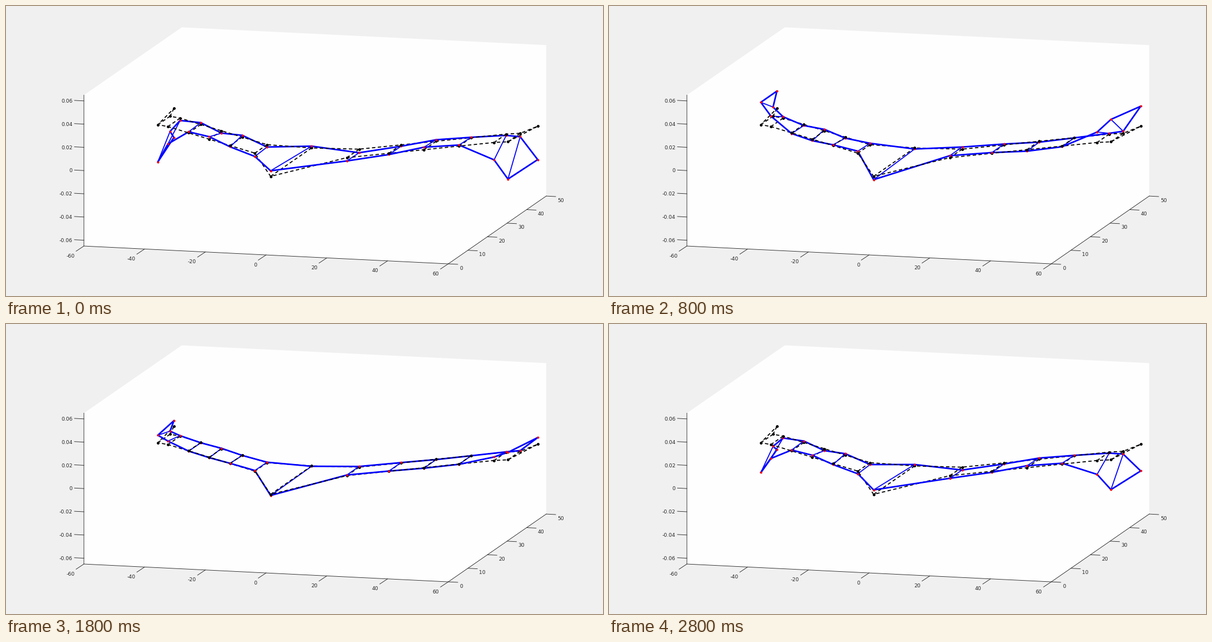
These frames come from a looping animation (1073x522 px, 3 s). A matplotlib script:

```python
import numpy as np
import matplotlib.pyplot as plt
from matplotlib.animation import FuncAnimation

W, H, DPI = 1073, 522, 100
PX = 72 / DPI
INK = "#262626"
SPAN, DEPTH, TOP = 60, 50, 0.065
RISE = 2090  # pixels per unit of z

fig = plt.figure(figsize=(W / DPI, H / DPI), dpi=DPI, facecolor="#f0f0f0")
ax = fig.add_axes([0, 0, 1, 1])
ax.set_xlim(0, W)
ax.set_ylim(H, 0)
ax.axis("off")


def project(x, y, z=0.0):
    """Orthographic view of the data box, in stage pixels."""
    px = 140 + 5.458 * (x + SPAN) + 3.52 * y
    py = 296.2 + 0.267 * (x + SPAN) - 2.44 * y - RISE * z
    return px, py


def line(xs, ys, color, width, **kw):
    return ax.plot(xs, ys, color=color, lw=width * PX, **kw)[0]


def tick(point, step, gap, text, ha):
    """Tick mark along step, with its label at the given gap."""
    px, py = point
    line([px, px + step[0]], [py, py + step[1]], INK, 0.9, zorder=1)
    ax.text(px + gap[0], py + gap[1], text, ha=ha, va="center_baseline",
            color=INK, family="DejaVu Sans", fontsize=9.3 * PX)


def draw_box():
    corners = [(-SPAN, 0, TOP), (-SPAN, DEPTH, TOP), (SPAN, DEPTH, TOP),
               (SPAN, DEPTH, -TOP), (SPAN, 0, -TOP), (-SPAN, 0, -TOP)]
    px, py = project(*np.array(corners).T)
    ax.fill(px, py, color="#fefefe", lw=0, zorder=0)
    line(px[[0, 5, 4, 3]], py[[0, 5, 4, 3]], INK, 0.9, zorder=1)
    for v in range(-6, 7, 2):
        text = f"{v / 100:.2f}" if v else "0"
        tick(project(-SPAN, 0, v / 100), (-17, -0.9), (-20.4, -0.4), text, "right")
    for v in range(-SPAN, SPAN + 1, 20):
        tick(project(v, 0, -TOP), (-14, 9.3), (-16.5, 17), str(v), "right")
    for v in range(0, DEPTH + 1, 10):
        tick(project(SPAN, v, -TOP), (17, 0.9), (20, 7), str(v), "left")


def wave(x, size, reach):
    """Ripple that fades from the root of the wing outwards."""
    return size * np.cos(2 * np.pi * x / 38) * np.exp(-x / reach)


def curl(x, start, end, power):
    """Bend from 0 at start to 1 at end."""
    return np.clip((x - start) / (end - start), 0, None) ** power


# Flat swept wing, mirrored about x = 0
ROOT, OUTER, RIM, TIP = 15.15, 53.7, 57.65, 59.9
half = np.r_[ROOT, np.linspace(26.15, OUTER, 4), RIM]
front_x = np.r_[-half[::-1], 0, half]
back_x = np.r_[-TIP, front_x, TIP]
front_y = np.interp(abs(front_x), [0, ROOT, OUTER, RIM], [2.3, 17.75, 33.15, 34.1])
back_y = np.interp(abs(back_x), [0, ROOT, OUTER, RIM, TIP],
                   [23.25, 24, 39.35, 40.35, 45.8])

# Mode shape in pixels, positive downwards
front_r, back_r = abs(front_x), abs(back_x)
front_d = wave(front_r, 10, 50) - 64 * curl(front_r, 44.4, RIM, 2.3)
zigzag = 3.7 * np.cos(np.pi * np.arange(-7, 8)) - 0.5
left_d = zigzag - 48 * curl(back_r, OUTER, TIP, 1)
right_d = wave(back_r, 12, 30) - 0.6 - 58 * curl(back_r, OUTER, TIP, 6)
back_d = np.where(back_x <= 0, left_d, right_d)

x, rest = project(np.r_[back_x, front_x[::-1]], np.r_[back_y, front_y[::-1]])
swing = np.r_[back_d, front_d[::-1]]
n = len(x)
outline = [(i, (i + 1) % n) for i in range(n)]
ribs = [(i + 1, n - 1 - i) for i in range(len(front_x))]


def draw_rest_shape():
    dash = dict(dashes=(3.4, 2.4), dash_capstyle="butt", zorder=3)
    line(np.append(x, x[0]), np.append(rest, rest[0]), "black", 1.8, **dash)
    for a, b in ribs:
        line(x[[a, b]], rest[[a, b]], "black", 1.8, **dash)
    ax.plot(x, rest, "o", color="black", ms=5 * PX, mew=0, zorder=6)


draw_box()
draw_rest_shape()

edges = [(pair, line([], [], "blue", width, solid_capstyle="round"))
         for group, width in ((outline, 2.8), (ribs, 1.8)) for pair in group]
dots_below, dots_above = [
    ax.plot([], [], "o", color="red", ms=4 * PX, mew=0, zorder=z)[0]
    for z in (5, 7)]


def deflection(k):
    """Fast rise from -1 to 1, then a fall at half the speed."""
    return -1 + 0.4 * k if k <= 5 else 1 - 0.2 * (k - 5)


def update(k):
    shift = swing * deflection(k)
    y = rest + shift
    for (a, b), art in edges:
        art.set_data([x[a], x[b]], [y[a], y[b]])
        # the higher of the two shapes lies nearer the viewer
        art.set_zorder(4 if shift[a] + shift[b] < 0 else 2)
    up = shift < 0
    dots_above.set_data(x[up], y[up])
    dots_below.set_data(x[~up], y[~up])
    return [art for _, art in edges] + [dots_below, dots_above]


anim = FuncAnimation(fig, update, frames=15, interval=200, repeat=True)
plt.show()
```
